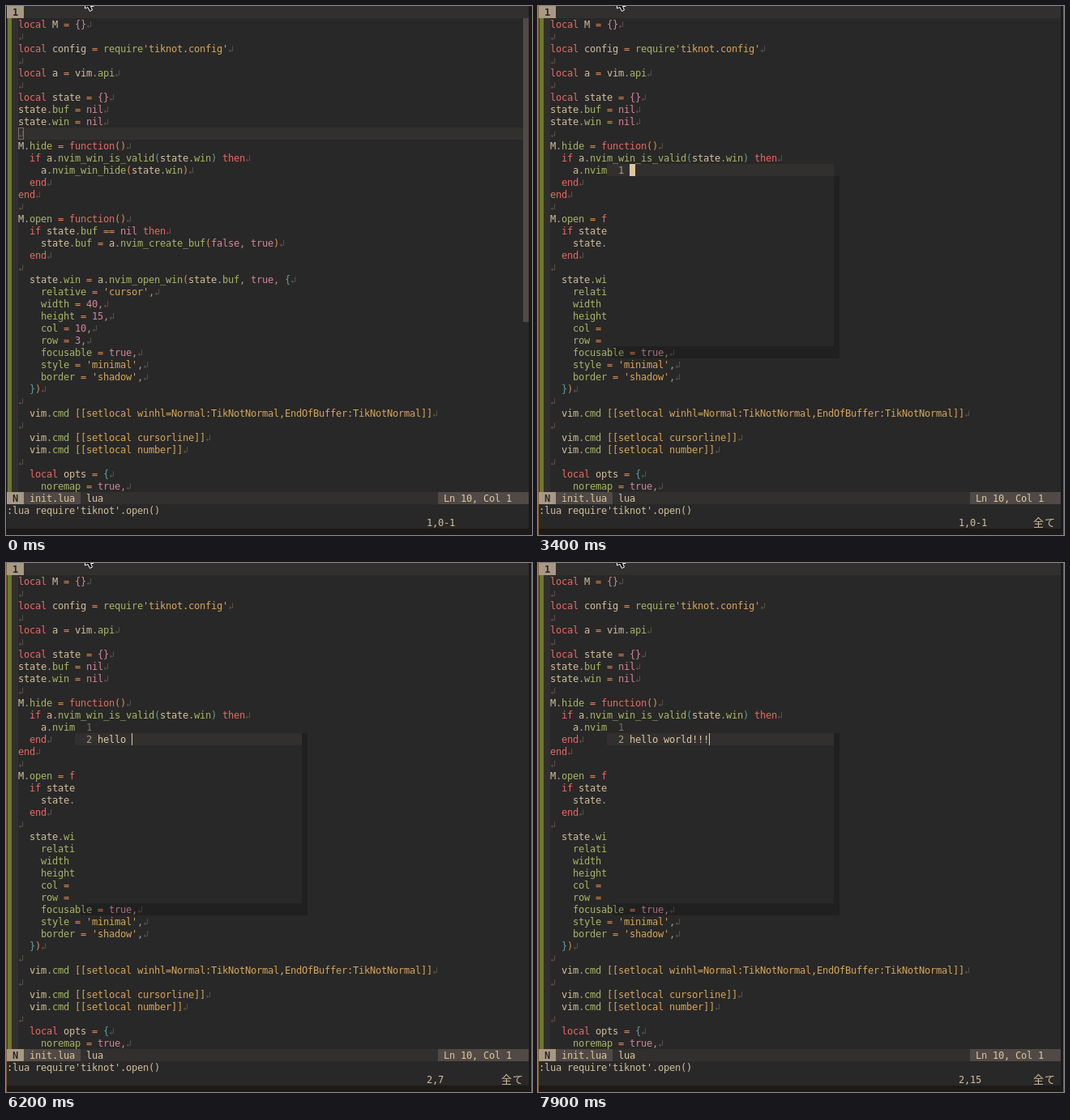
Write an HTML page with a canvas that moves like this. It is 649 px wide and 653 px high and loops after 8000 ms.

```html
<!DOCTYPE html>
<html lang="en">
<head>
<meta charset="utf-8">
<title>Floating note window</title>
<style>
  html, body { margin: 0; width: 100%; height: 100%; overflow: hidden; background: #282828; }
  canvas { display: block; }
</style>
</head>
<body>
<canvas id="stage" width="649" height="653"></canvas>
<script>
const ctx = document.getElementById('stage').getContext('2d');
const LOOP = 8000, CELL = 7, ROW = 15, BASELINE = 12;
const C = {
  bg: '#282828', line: '#32302f', block: '#504945', menu: '#45403d', mode: '#a89984',
  fg: '#d4be98', bright: '#ddc7a1', grey: '#a89984', dim: '#7c6f64', eol: '#5a524c',
  red: '#ea6962', orange: '#e78a4e', yellow: '#d8a657', green: '#a9b665',
  aqua: '#5f9f98', purple: '#d3869b', sign: '#6c782e', edge: '#1c1918', focus: '#8a6135'
};

const code = `local M = {}

local config = require'tiknot.config'

local a = vim.api

local state = {}
state.buf = nil
state.win = nil

M.hide = function()
  if a.nvim_win_is_valid(state.win) then
    a.nvim_win_hide(state.win)
  end
end

M.open = function()
  if state.buf == nil then
    state.buf = a.nvim_create_buf(false, true)
  end

  state.win = a.nvim_open_win(state.buf, true, {
    relative = 'cursor',
    width = 40,
    height = 15,
    col = 10,
    row = 3,
    focusable = true,
    style = 'minimal',
    border = 'shadow',
  })

  vim.cmd [[setlocal winhl=Normal:TikNotNormal,EndOfBuffer:TikNotNormal]]

  vim.cmd [[setlocal cursorline]]
  vim.cmd [[setlocal number]]

  local opts = {
    noremap = true,`.split('\n');

const syntax = [
  ['yellow', /'.*?'|\[\[.*?\]\]/],
  ['red', /\b(?:local|function|if|then|end)\b/],
  ['purple', /\b(?:nil|true|false|\d+)\b|\{\}/],
  ['green', /\brequire\b|(?<=\.)\w+|^ +\w+(?= = )/],
  ['aqua', /[{}]|\((?=state\.win\) then)|\)(?= then)/],
  ['orange', /=+|[()]/],
  ['grey', /[.,]/],
  ['fg', /\w+/]
];
const tokens = new RegExp(syntax.map(([, re]) => `(${re.source})`).join('|'), 'g');

function rect(color, x, y, w, h) {
  ctx.fillStyle = color;
  ctx.fillRect(x, y, w, h);
}

// One glyph per terminal cell
function text(str, x, y, color = C.fg, weight = '') {
  ctx.font = `${weight} 12px "DejaVu Sans Mono", monospace`;
  ctx.fillStyle = color;
  [...str].forEach((ch, i) => ctx.fillText(ch, x + i * CELL, y + BASELINE));
}

function drawCode() {
  code.forEach((line, i) => {
    const y = (i + 1) * ROW;
    for (const m of line.matchAll(tokens)) {
      const kind = m.slice(1).findIndex(g => g !== undefined);
      text(m[0], 15 + m.index * CELL, y, C[syntax[kind][0]]);
    }
    text('↲', 15 + line.length * CELL, y, C.eol);
  });
}

function drawFrame(focused) {
  rect(C.bg, 0, 0, 649, 653);
  rect(C.line, 1, 0, 644, ROW);
  rect(C.mode, 1, 0, 21, ROW);
  text('1', 8, 0, C.bg, 'bold');
  rect(C.line, 1, ROW, 14, 585);
  rect(C.sign, 2, ROW, 5, 585);
  rect(C.edge, 645, 0, 4, 653);
  rect(C.edge, 0, 645, 649, 8);
  rect(focused ? C.focus : C.edge, 0, 0, 1, 653);
  rect(focused ? C.focus : C.edge, 648, 0, 1, 653);
}

function drawPointer() {
  ctx.beginPath();
  [[97.5, -1], [97.5, 3], [101, 1.5], [103.5, 6.5], [106.5, 5], [104.5, .5], [108, .5], [107, -1]]
    .forEach(p => ctx.lineTo(...p));
  ctx.fillStyle = '#111';
  ctx.fill();
  ctx.strokeStyle = '#fff';
  ctx.lineWidth = 1;
  ctx.stroke();
}

function drawStatus(filled) {
  rect(C.line, 1, 600, 644, ROW);
  if (!filled) return;
  rect(C.mode, 1, 600, 21, ROW);
  rect(C.block, 22, 600, 70, ROW);
  rect(C.block, 533, 600, 112, ROW);
  text('N', 8, 600, C.bg, 'bold');
  text('init.lua', 29, 600, C.bright);
  text('lua', 99, 600, C.bright);
  text('Ln 10, Col 1', 540, 600, C.bright);
}

function drawRuler(pos, all) {
  text(pos, 519, 630);
  if (!all) return;
  ctx.font = '13px "Noto Sans CJK JP", "Noto Sans CJK", sans-serif';
  ctx.fillText('全', 611, 630 + BASELINE);
  ctx.fillText('て', 625, 630 + BASELINE);
}

function drawMenu(x, words) {
  const width = Math.max(...words.map(w => w.length));
  rect(C.menu, x, 225, (width + 11) * CELL, words.length * ROW);
  words.forEach((word, i) =>
    text(word.padEnd(width + 1) + '[Buffer]', x + CELL, 225 + i * ROW, C.bright));
}

const note = 'hello world!!!';
const keyTimes = [5400, 5500, 5700, 5800, 6000, 6200, 6400, 6600, 6700, 7100, 7300, 7600, 7800, 7900];

function drawNote(t) {
  const typed = keyTimes.filter(k => t >= k).length;
  const inserting = t >= 4800;
  rect(C.bg, 85, 195, 280, 225);
  rect('rgba(0,0,0,.2)', 365, 210, 7, 225);
  rect('rgba(0,0,0,.2)', 92, 420, 273, ROW);
  rect(C.line, 85, inserting ? 210 : 195, 280, ROW);
  text('1', 99, 195, inserting ? C.dim : C.grey);
  if (!inserting) {
    rect(C.bright, 113, 195, CELL, ROW);
    return drawRuler('1,0-1', true);
  }
  text('2', 99, 210, C.grey);
  text(note.slice(0, typed === 1 ? 2 : typed), 113, 210, C.bright);
  rect(C.bright, 113 + typed * CELL, 210, 1, ROW);
  if (typed === 1 || typed === 2) drawMenu(106, ['height', 'hide', 'hide_on_winleave', 'nvim_win_hide']);
  if (typed === 7) drawMenu(148, ['width', 'win', 'winhl', 'hide_on_winleave', 'nvim_win_hide']);
  drawRuler(`2,${typed + 1}`, true);
}

function draw(t) {
  const focused = t >= 500, command = t >= 1100 && t < 3400, floating = t >= 3400;
  drawFrame(focused);
  if (!floating) {
    rect(C.line, 15, 150, 623, ROW);
    rect(C.block, 638, ROW, 7, 375);
  }
  drawCode();
  drawStatus(!command);
  const cmdline = t >= 1100 && t < 1600 ? ':' : ":lua require'tiknot'.open()";
  text(cmdline, 1, 615);
  if (command) {
    rect(C.bright, 1 + cmdline.length * CELL, 615, CELL, ROW);
  } else if (floating) {
    drawNote(t);
  } else {
    drawRuler('1,0-1', false);
    if (focused) {
      rect(C.bright, 15, 150, CELL, ROW);
      text('↲', 15, 150, C.bg);
    } else {
      ctx.strokeStyle = C.dim;
      ctx.lineWidth = 1;
      ctx.strokeRect(15.5, 150.5, 6, 14);
    }
  }
  drawPointer();
}

const start = performance.now();
function tick() {
  draw((performance.now() - start) % LOOP);
  requestAnimationFrame(tick);
}
tick();
</script>
</body>
</html>
```
